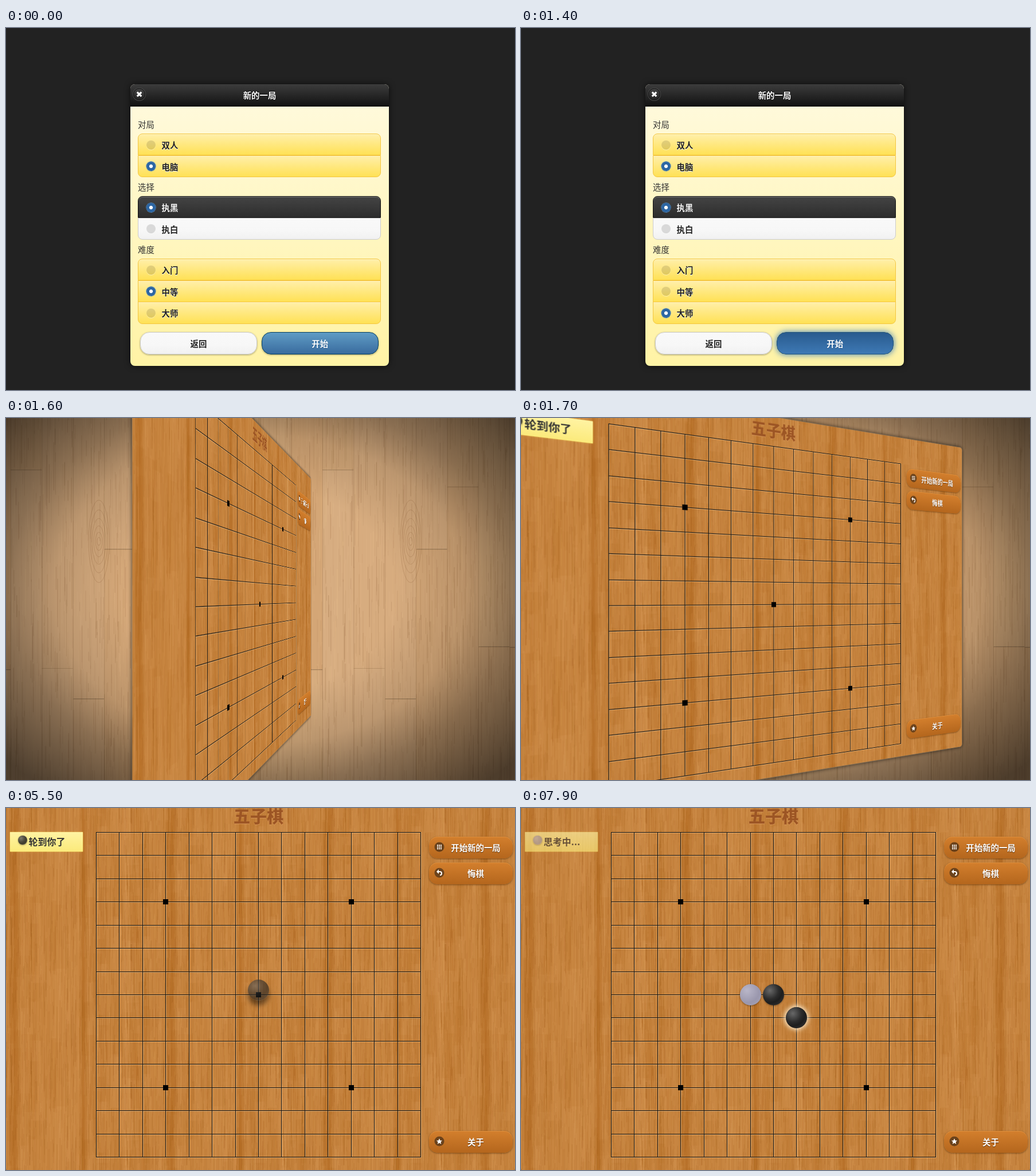
Animation of 888x631 px, one loop 8 s. Source, as an HTML page with a canvas:

```html
<!DOCTYPE html>
<html lang="zh-CN">
<head>
<meta charset="utf-8">
<title>五子棋</title>
<style>
html, body { margin: 0; width: 100%; height: 100%; overflow: hidden; background: #222; }
body { font: 14.4px "Noto Sans CJK SC", "Noto Sans CJK", "Noto Sans", sans-serif; }
#stage { position: relative; width: 888px; height: 631px; overflow: hidden; background: #222; }
#stage *, #stage { box-sizing: border-box; }
#stage div, canvas, svg { position: absolute; white-space: nowrap; }
#floor, #dialog, #game { left: 0; top: 0; width: 888px; height: 631px; transform-origin: 444px 313px; }
#vignette { inset: 0; background: radial-gradient(560px 420px at 444px 300px, transparent 42%, rgba(0,0,0,.13) 64%, rgba(0,0,0,.36) 80%, rgba(0,0,0,.64) 106%); }

/* dialog */
.panel { border-radius: 8px; background: linear-gradient(#fffadf, #fff3a5); box-shadow: 0 0 11px rgba(0,0,0,.65); }
.head { border-radius: 8px 8px 0 0; background: linear-gradient(#3c3c3c, #111); color: #fff; font-weight: 700; text-align: center; text-shadow: 0 -1px 1px #000; line-height: 38px; }
.close { border-radius: 50%; background: linear-gradient(#444, #222); border: 1px solid #111; box-shadow: 0 0 0 1px #484848; }
.caption { color: #333; line-height: 20px; }
.row { border: 1px solid; padding-left: 41px; line-height: 37px; font-weight: 700; box-shadow: inset 0 1px 0 rgba(255,255,255,.3); }
.row.first { border-radius: 8px 8px 0 0; }
.row.last { border-radius: 0 0 8px 8px; }
.pill { border: 1px solid; border-radius: 16px; text-align: center; line-height: 38px; font-weight: 700; box-shadow: 0 1px 3px rgba(0,0,0,.35); }
.yellow { color: #222; border-color: #f4c63f; background: linear-gradient(#ffefaa, #ffe155); text-shadow: 0 1px 0 #fff; }
.yellow.hover { background: linear-gradient(#fff5ba, #fbdd52); }
.yellow.down { background: linear-gradient(#f8d94c, #fadb4e); }
.black { color: #fff; border-color: #111; background: linear-gradient(#444, #2d2d2d); text-shadow: 0 1px 0 #111; }
.white { color: #222; border-color: #ccc; background: linear-gradient(#f9f9f9, #f7f7f7 60%, #f1f1f1); text-shadow: 0 1px 0 #fff; }
.row::before { content: ""; position: absolute; left: 14px; top: 10.5px; width: 16px; height: 16px; border-radius: 50%; background: rgba(0,0,0,.12); box-shadow: 0 1px 0 rgba(255,255,255,.4); }
.row.on::before { background: radial-gradient(circle, #fff 2.7px, #2c66a4 3.6px); box-shadow: 0 0 0 .7px #5389bd; }
.go { color: #fff; border-color: #044062; background: linear-gradient(#5f9cc5, #396b9e); text-shadow: 0 1px 0 #194b7e; }
.go.hover { background: linear-gradient(#6facd5, #4272a4); }
.go.down { border-color: #225377; background: linear-gradient(#295b8e, #3e79b5); box-shadow: 0 0 11px #387bbe; }

/* game */
.board { overflow: hidden; border-radius: 6px; }
.shade { border-radius: 6px; box-shadow: 0 0 9px rgba(0,0,0,.8), 0 0 0 1px rgba(255,220,170,.5); }
.title { font-size: 29px; font-weight: 700; line-height: 40px; text-align: center; color: #9c5524; -webkit-text-stroke: .5px #9c5524; text-shadow: 0 1px 1px #e3a566; }
.note { background: linear-gradient(#fff3a2, #fbea7b); box-shadow: 0 0 2px rgba(255,225,90,.8); color: #333; font-size: 16px; font-weight: 700; line-height: 32px; padding-left: 32.5px; }
.cmd { border-radius: 15px; color: #fff; font-weight: 700; text-align: center; padding-left: 17px; line-height: 37px; background: linear-gradient(#d37f2d, #b4661d); text-shadow: 0 1px 1px #5a300a; box-shadow: 0 1px 3px rgba(70,35,0,.55), inset 0 1px 0 rgba(255,190,110,.25); }
.cmd svg { left: 9px; top: 9px; }
.stone { border-radius: 50%; visibility: hidden; }
.ink { background: radial-gradient(circle at 33% 30%, #686868, #2c2c2c 42%, #1e1e1e 60%, #3a3a3a); }
.pearl { background: radial-gradient(circle at 33% 30%, #b9b6c8, #9a97ad 60%, #a9a6b9); }
.lift { visibility: visible; opacity: .62; transform: translateY(-8px); box-shadow: 0 8px 8px rgba(0,0,0,.75); }
.set { visibility: visible; box-shadow: 0 1px 3px rgba(0,0,0,.4); }
.glow { visibility: visible; box-shadow: 0 0 8px 2px #fff3d8; }
.note .stone { opacity: .85; }
</style>
</head>
<body>
<div id="stage">
  <div id="floor"></div>
  <div id="game"></div>
  <div id="dialog"></div>
</div>
<script>
const $ = id => document.getElementById(id);
const [floor, game, dialog] = ['floor', 'game', 'dialog'].map($);

function box(parent, cls, x, y, w, h, html = '') {
  const el = document.createElement('div');
  el.className = cls;
  el.style.cssText = `left:${x}px;top:${y}px;width:${w}px;height:${h}px`;
  el.innerHTML = html;
  return parent.appendChild(el);
}

function random(seed) {
  return () => (seed = (seed * 16807) % 2147483647) / 2147483647;
}

// Paints one wood tile and repeats it over the parent.
function wood(parent, w, h, tileW, tileH, shiftX, paint) {
  const tile = document.createElement('canvas');
  tile.width = tileW;
  tile.height = tileH;
  paint(tile.getContext('2d'));
  const canvas = document.createElement('canvas');
  canvas.width = w;
  canvas.height = h;
  const ctx = canvas.getContext('2d');
  for (let x = shiftX - tileW; x < w; x += tileW)
    for (let y = 0; y < h; y += tileH) ctx.drawImage(tile, x, y);
  parent.appendChild(canvas);
}

function streaks(ctx, rnd, count, w, h, dark, light, strength) {
  for (let i = 0; i < count; i++) {
    const x = rnd() * w, y = rnd() * h, len = 14 + rnd() * 85;
    ctx.fillStyle = `rgba(${rnd() < .5 ? dark : light},${rnd() * strength})`;
    const width = .5 + rnd();
    ctx.fillRect(x, y, width, len);
    ctx.fillRect(x, y - h, width, len);
  }
}

// A soft vertical grain band.
function band(ctx, x, y, w, h, tone, alpha) {
  const g = ctx.createLinearGradient(x, 0, x + w, 0);
  g.addColorStop(0, `rgba(${tone},0)`);
  g.addColorStop(.5, `rgba(${tone},${alpha})`);
  g.addColorStop(1, `rgba(${tone},0)`);
  ctx.fillStyle = g;
  ctx.fillRect(x, y, w, h);
}

function paintFloor(ctx) {
  const rnd = random(41), plank = 54.4;
  for (let i = 0; i < 10; i++) {
    const x = i * plank, joint = 90 + rnd() * 430;
    for (const [y, h] of [[0, joint], [joint, 640 - joint]]) {
      ctx.fillStyle = `hsl(31,52%,${64.5 + rnd() * 3}%)`;
      ctx.fillRect(x, y, plank + 1, h);
    }
    ctx.fillStyle = 'rgba(90,55,20,.2)';
    ctx.fillRect(x, 0, 1, 640);
    ctx.fillRect(x, joint, plank, 1);
  }
  streaks(ctx, rnd, 2600, 544, 640, '120,75,35', '245,205,155', .17);
  ctx.strokeStyle = 'rgba(120,70,30,.2)';
  for (let i = 1; i < 7; i++) {
    ctx.beginPath();
    ctx.ellipse(154, 215, 3 * i, 6 * i + i * i, 0, 0, 7);
    ctx.stroke();
  }
}

function paintBoard(ctx) {
  const rnd = random(77), w = 274, h = 240;
  const dark = '174,100,26', light = '218,156,92';
  ctx.fillStyle = '#c78540';
  ctx.fillRect(0, 0, w, h);
  for (let i = 0; i < 34; i++) {
    const x = rnd() * w, y = rnd() * h, bw = 10 + rnd() * 26, bh = 110 + rnd() * 40;
    const tone = rnd() < .5 ? dark : light;
    band(ctx, x, y, bw, bh, tone, .22);
    band(ctx, x, y - h, bw, bh, tone, .22);
  }
  band(ctx, 125, 0, 20, h, dark, .7);
  band(ctx, 5, 0, 20, h, dark, .5);
  streaks(ctx, rnd, 1500, w, h, '150,82,18', '226,168,105', .2);
}

// Floor and board
wood(floor, 888, 631, 544, 640, 8, paintFloor);
floor.insertAdjacentHTML('beforeend', '<div id="vignette"></div>');
box(game, 'shade', 0, -10, 888, 644);
wood(box(game, 'board', 0, -10, 888, 644), 888, 644, 274, 240, 0, paintBoard);

const LEFT = 157, TOP = 42, CELL = 566 / 14;
const at = (origin, i) => Math.round(origin + i * CELL);
let lines = '', shine = '', dots = '';
for (let i = 0; i < 15; i++) {
  const x = at(LEFT, i) + .5, y = at(TOP, i) + .5;
  lines += `M${x} 42V609M157 ${y}H724`;
  shine += `M${x + 1} 42V609M157 ${y + 1}H724`;
}
for (const [c, r] of [[3, 3], [11, 3], [7, 7], [3, 11], [11, 11]])
  dots += `M${at(LEFT, c) - 4} ${at(TOP, r) - 4}h9v9h-9z`;
game.insertAdjacentHTML('beforeend', `<svg width="888" height="631">
  <path d="${shine}" stroke="#f4c68c" stroke-opacity=".55"/>
  <path d="${lines}" stroke="#111"/><path d="${dots}"/></svg>`);

box(game, 'title', 380, -7.5, 121, 40, '五子棋');
const note = box(game, 'note', 7, 42, 127, 34, '<span></span>');
const noteStone = box(note, 'stone set', 14, 6, 16, 16);

const icons = {
  grid: '<path d="M5 6h8M5 9h8M5 12h8" stroke="#fff" stroke-width="2" stroke-dasharray="2 1"/>',
  undo: '<path d="M6 7h4a3 3 0 0 1 0 6" fill="none" stroke="#fff" stroke-width="2"/><path d="M8 3v8L4 7z" fill="#fff"/>',
  star: '<path d="M9 4l1.5 3.4 3.6.3-2.7 2.4.8 3.6L9 11.8l-3.2 1.9.8-3.6-2.7-2.4 3.6-.3z" fill="#fff"/>'
};
for (const [y, icon, text] of [[50, 'grid', '开始新的一局'], [95, 'undo', '悔棋'], [563, 'star', '关于']])
  box(game, 'cmd', 738, y, 146, 38,
    `<svg width="18" height="18"><circle cx="9" cy="9" r="8.5" fill="#6b421b"/>${icons[icon]}</svg>${text}`);

const stones = [[7, 7, 'ink'], [6, 7, 'pearl'], [8, 8, 'ink']].map(([c, r, kind]) => ({
  kind, el: box(game, 'stone', at(LEFT, c) - 18, at(TOP, r) - 18, 37, 37)
}));

// Dialog
box(dialog, 'panel', 217, 98, 451, 491);
box(dialog, 'head', 217, 98, 451, 39, '新的一局');
box(dialog, 'close', 222, 105, 21, 21,
  '<svg width="19" height="19"><path d="M5.8 5.8l7.4 7.4M13.2 5.8l-7.4 7.4" stroke="#fff" stroke-width="3.2"/></svg>');

function group(caption, y, names, themes, chosen) {
  box(dialog, 'caption', 230, y - 26, 100, 20, caption);
  return names.map((name, i) => {
    const end = i === 0 ? 'first' : i === names.length - 1 ? 'last' : '';
    const base = `row ${themes[i]} ${end}`;
    const el = box(dialog, base + (i === chosen ? ' on' : ''), 229.5, y + i * 37.6, 424.5, 38.4, name);
    return { el, base };
  });
}
group('对局', 184, ['双人', '电脑'], ['yellow', 'yellow'], 1);
group('选择', 293, ['执黑', '执白'], ['black', 'white'], 0);
const levels = group('难度', 402, ['入门', '中等', '大师'], ['yellow', 'yellow', 'yellow'], 1);
box(dialog, 'pill white', 234, 530, 204, 39, '返回');
const go = box(dialog, 'pill go', 446, 530, 203.5, 39, '开始');

// Each cue changes part of the state from its time on.
const LOOP = 8000;
const cues = [
  [0, { scene: 'menu', turn: 0, depth: 967, row: -1, press: 'hover', level: 1, go: '',
        stones: ['', '', ''], note: '轮到你了', side: 'ink', fade: 1 }],
  [200, { row: 0 }],
  [500, { row: 2 }],
  [700, { press: 'down' }],
  [800, { press: 'hover', level: 2 }],
  [1000, { row: -1 }],
  [1100, { go: 'hover' }],
  [1400, { go: 'down' }],
  [1500, { scene: 'leave', turn: -30.8, go: 'hover' }],
  [1600, { scene: 'play', turn: 72, depth: 892 }],
  [1700, { turn: 24.9 }],
  [1800, { turn: 1.5 }],
  [1900, { turn: 0 }],
  [5500, { stones: ['lift', '', ''] }],
  [5600, { stones: ['set', 'glow', ''] }],
  [7600, { stones: ['set', 'glow', 'lift'] }],
  [7700, { stones: ['set', 'set', 'glow'] }],
  [7800, { fade: .4 }],
  [7900, { note: '思考中...', side: 'pearl', fade: .65 }]
];

function render(s) {
  const playing = s.scene === 'play';
  floor.style.display = s.scene === 'menu' ? 'none' : '';
  game.style.display = playing ? '' : 'none';
  dialog.style.display = playing ? 'none' : '';
  (playing ? game : dialog).style.transform = s.turn
    ? `perspective(${s.depth}px) rotateY(${s.turn}deg) scale(${1 - Math.abs(s.turn) / 900})` : 'none';
  levels.forEach(({ el, base }, i) => {
    el.className = `${base} ${i === s.row ? s.press : ''} ${i === s.level ? 'on' : ''}`;
  });
  go.className = 'pill go ' + s.go;
  stones.forEach(({ el, kind }, i) => { el.className = `stone ${kind} ${s.stones[i]}`; });
  note.firstChild.textContent = s.note;
  note.style.opacity = s.fade;
  noteStone.className = `stone set ${s.side}`;
}

const start = performance.now();
let shown = -1;
function tick() {
  const t = (performance.now() - start) % LOOP;
  const past = cues.filter(([time]) => time <= t);
  if (past.length !== shown) {
    shown = past.length;
    render(Object.assign({}, ...past.map(([, change]) => change)));
  }
  requestAnimationFrame(tick);
}
tick();
</script>
</body>
</html>
```
